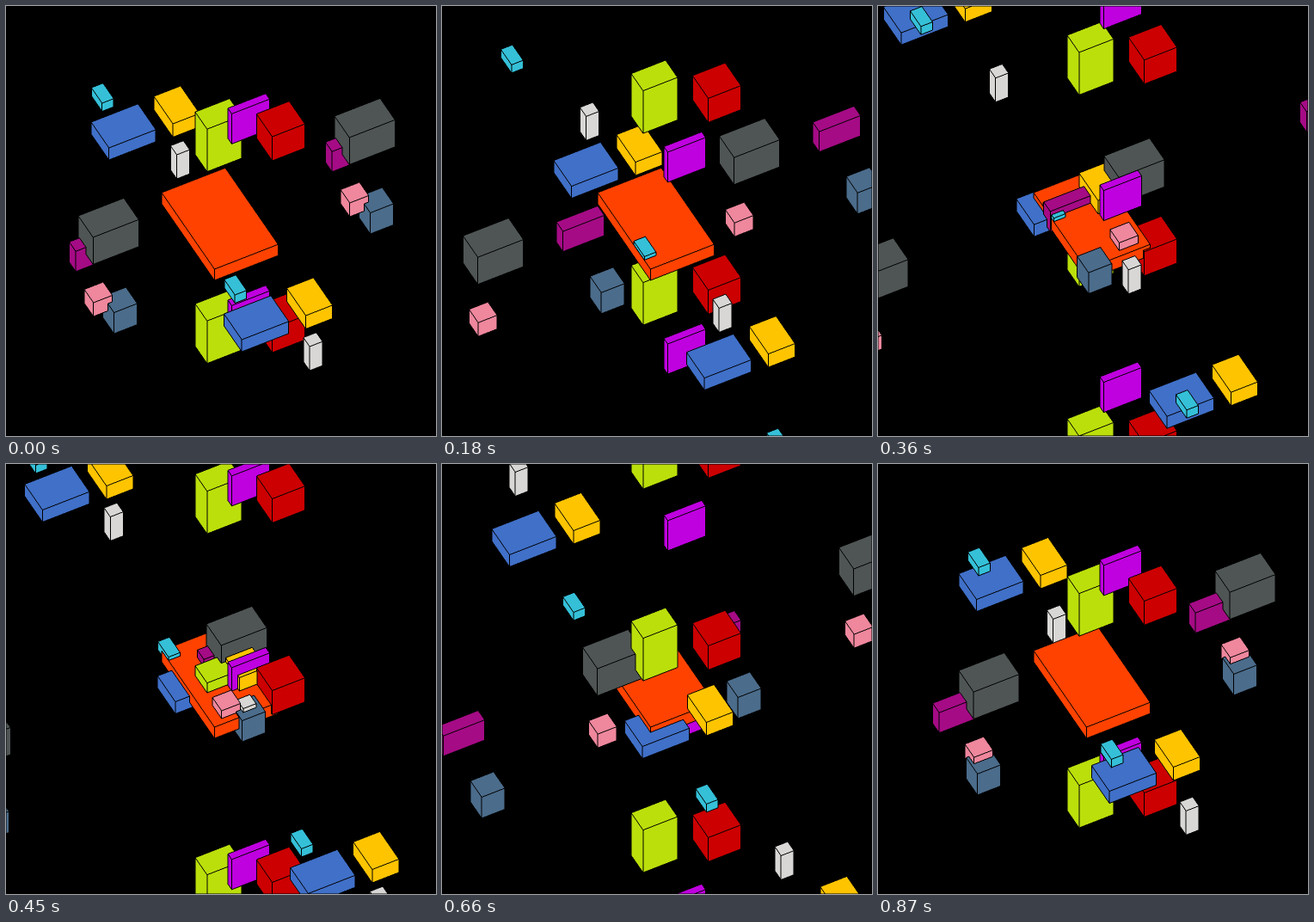
An HTML page with a canvas that plays this animation: 500x500 px, repeating every 0.9 s.

```html
<!DOCTYPE html>
<html lang="en">
<head>
<meta charset="utf-8">
<title>Block streams</title>
<style>
html, body { margin: 0; width: 100%; height: 100%; overflow: hidden; background: #000; }
canvas { display: block; width: 500px; height: 500px; }
</style>
</head>
<body>
<canvas id="stage" width="500" height="500"></canvas>
<script>
const SIZE = 500, SS = 2, N = SIZE * SS;
const LOOP = 900, STEP = 30;

// Screen directions of the two ground axes; the third axis is straight up.
const U = [1, -0.389], V = [0.69, 1];

// Travel per loop along each axis: screen x, screen y, height.
const LANES = {
  u: [298, -116, 0],
  v: [154.5, 223, 0],
  w: [0, -223, 223]
};

// colour, lane, direction, x, y and height of the top left corner, size along u, v, w
const BOXES = [
  ['#ff4200', '', 0, 181, 217, 0, 74, 89, 13],
  ['#4f5555', 'u', -1, 382, 128, 32, 53, 25, 31.5],
  ['#a50b85', 'u', 1, 73.5, 274.3, 8.5, 48, 11, 23.5],
  ['#ef879d', 'u', -1, 91, 329.5, 9, 22, 15.5, 16],
  ['#4b6c8b', 'u', 1, 112.5, 337.5, 1.5, 27, 19, 24.5],
  ['#4070c8', 'v', 1, 99, 135, -6, 54.5, 30, 14],
  ['#ffc400', 'v', 1, 172, 105, 15.7, 31, 32, 15.5],
  ['#d8d7d6', 'v', -1, 191.3, 162.5, 6, 15, 10.5, 28],
  ['#35c0d8', 'v', -1, 99.3, 95, 4, 13.5, 18, 9.5],
  ['#bbdf0b', 'w', 1, 220, 123.2, 122.8, 40, 20, 49.5],
  ['#cc0000', 'w', 1, 291.3, 125.5, 129.8, 38, 26.5, 28],
  ['#bf00df', 'w', -1, 258, 118.9, 138.7, 44, 6.5, 35]
];

const ctx = document.getElementById('stage').getContext('2d');
const depth = new Float32Array(N * N);
const ids = new Uint8Array(N * N);
let palette;

const rgb = hex => [1, 3, 5].map(i => parseInt(hex.slice(i, i + 2), 16));
const scale = (v, k) => [v[0] * k, v[1] * k];

// Fill a parallelogram; at equal screen points the higher one is nearer.
function face(color, x, y, p, q, top, drop) {
  const id = palette.push(color) - 1;
  const xs = [x, x + p[0], x + q[0], x + p[0] + q[0]];
  const ys = [y, y + p[1], y + q[1], y + p[1] + q[1]];
  const lo = list => Math.max(0, Math.floor(Math.min(...list) * SS));
  const hi = list => Math.min(N - 1, Math.ceil(Math.max(...list) * SS));
  const x0 = lo(xs), x1 = hi(xs), y0 = lo(ys), y1 = hi(ys);
  const det = p[0] * q[1] - p[1] * q[0];
  for (let j = y0; j <= y1; j++) {
    const dy = (j + 0.5) / SS - y;
    for (let i = x0; i <= x1; i++) {
      const dx = (i + 0.5) / SS - x;
      const s = (dx * q[1] - dy * q[0]) / det;
      const t = (p[0] * dy - p[1] * dx) / det;
      if (s < 0 || s > 1 || t < 0 || t > 1) continue;
      const z = top - t * drop, at = j * N + i;
      if (z > depth[at]) {
        depth[at] = z;
        ids[at] = id;
      }
    }
  }
}

function box(color, x, y, top, a, b, h) {
  if (x > SIZE || x + a + b < 0 || y - a > SIZE || y + b + h < 0) return;
  const p = scale(U, a), q = scale(V, b), down = [0, h];
  face(color, x, y, p, q, top, 0);
  face(color, x, y, q, down, top, h);
  face(color, x + q[0], y + q[1], p, down, top, h);
}

// Average the samples; samples on a border between faces stay black.
function resolve() {
  const img = ctx.createImageData(SIZE, SIZE), out = img.data;
  for (let y = 0; y < SIZE; y++) {
    for (let x = 0; x < SIZE; x++) {
      let r = 0, g = 0, b = 0;
      for (let k = 0; k < SS * SS; k++) {
        const at = (y * SS + (k / SS | 0)) * N + x * SS + k % SS;
        const id = ids[at];
        if (!id || ids[at - 1] !== id || ids[at + 1] !== id ||
            ids[at - N] !== id || ids[at + N] !== id) continue;
        const c = palette[id];
        r += c[0];
        g += c[1];
        b += c[2];
      }
      const o = (y * SIZE + x) * 4, n = SS * SS;
      out[o] = r / n;
      out[o + 1] = g / n;
      out[o + 2] = b / n;
      out[o + 3] = 255;
    }
  }
  return img;
}

function render(time) {
  depth.fill(-1e6);
  ids.fill(0);
  palette = [[0, 0, 0]];
  for (const [hex, lane, dir, x, y, top, a, b, h] of BOXES) {
    const color = rgb(hex);
    if (!lane) {
      box(color, x, y, top, a, b, h);
      continue;
    }
    const [lx, ly, lz] = LANES[lane];
    for (let k = -3; k <= 3; k++) {
      const s = k + dir * time / LOOP;
      box(color, x + lx * s, y + ly * s, top + lz * s, a, b, h);
    }
  }
  return resolve();
}

const cache = [];
let shown = -1;
const start = performance.now();

function tick() {
  const step = Math.floor(((performance.now() - start) % LOOP) / STEP);
  if (step !== shown) {
    cache[step] = cache[step] || render(step * STEP);
    ctx.putImageData(cache[step], 0, 0);
    shown = step;
  }
  requestAnimationFrame(tick);
}
tick();
</script>
</body>
</html>
```
